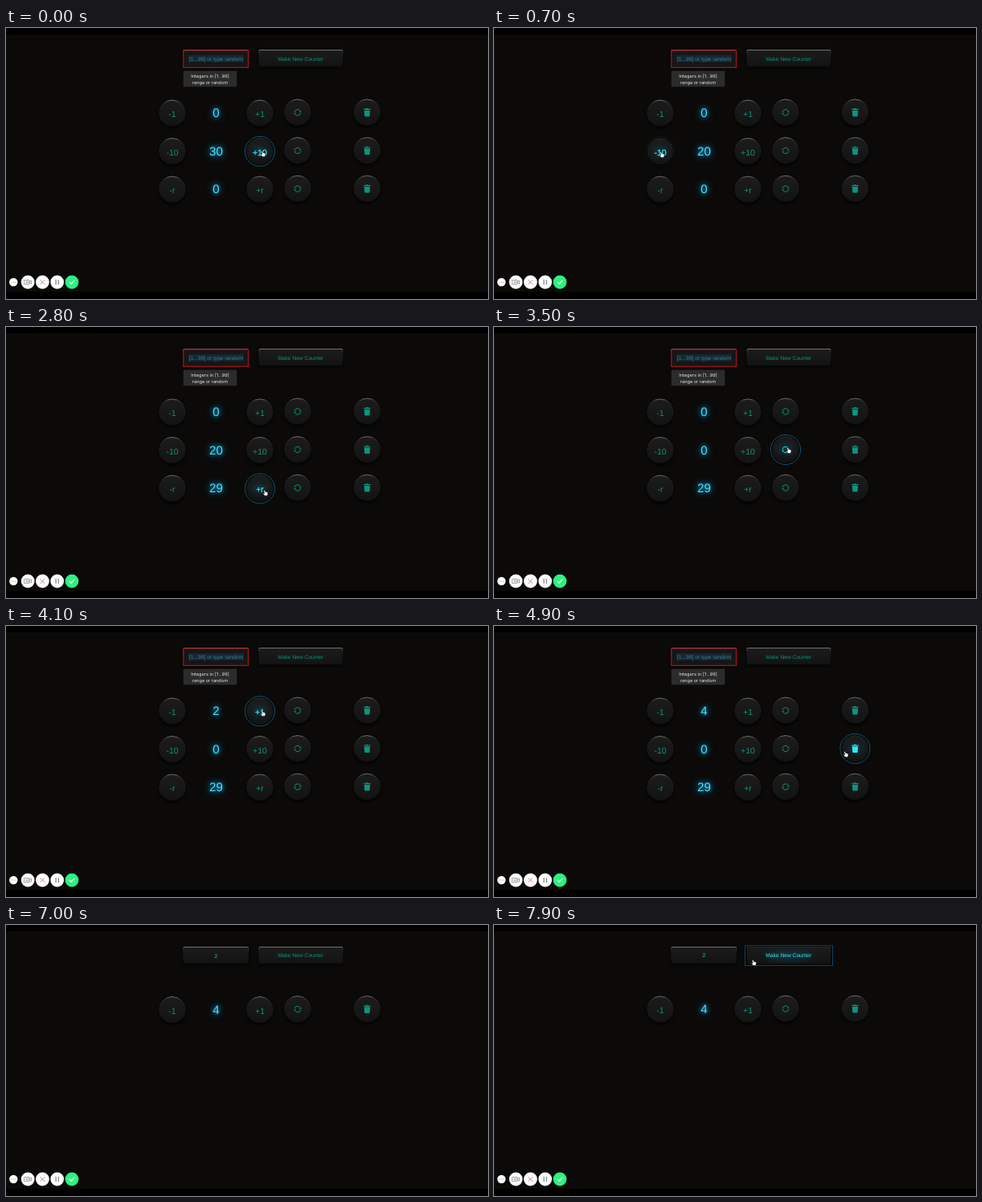
Animation, 600 px wide and 338 px high, one loop 8 s. Source, as an HTML page:

```html
<!DOCTYPE html>
<html lang="en">
<head>
<meta charset="utf-8">
<title>Counters</title>
<style>
  html, body { margin: 0; width: 100%; height: 100%; overflow: hidden; background: #000; }
  svg { display: block; width: 100%; height: 100%; }
  text { font-family: "Liberation Sans", Arial, sans-serif; text-anchor: middle; text-rendering: geometricPrecision; }
  .value { font-size: 15.2px; fill: #4fdff4; filter: drop-shadow(0 0 2px #0a86b4) drop-shadow(0 0 4px #066a9c); }
  .sign { font-size: 10.5px; }
  .small { font-size: 6.67px; }
  .tip { font: 5.6px Inter, sans-serif; fill: #e6e6e6; }
  .halo { fill: #0b86b8; filter: blur(4px); }
</style>
</head>
<body>
<svg id="stage" viewBox="0 0 600 338">
  <defs>
    <linearGradient id="face" x2="0" y2="1">
      <stop offset="0" stop-color="#1c1c1c"/><stop offset="1" stop-color="#131313"/>
    </linearGradient>
    <linearGradient id="rim" x2="0" y2="1">
      <stop offset="0" stop-color="#7a7a78"/><stop offset=".12" stop-color="#343433"/>
      <stop offset=".35" stop-color="#1a1a1a"/><stop offset="1" stop-color="#080808"/>
    </linearGradient>
    <filter id="soft" x="-30%" y="-30%" width="160%" height="160%"><feGaussianBlur stdDeviation="1.6"/></filter>
  </defs>
  <rect width="600" height="338"/>
  <rect y="8" width="600" height="321" fill="#0b0a09"/>
  <g id="page"></g>
  <g id="tools"></g>
  <g id="hand">
    <path fill="#fff" stroke="#111" stroke-width=".7" stroke-linejoin="round" transform="scale(.78)"
      d="M-2.6-4.2C-1.9-5-1.1-4.6-.8-3.8L-.2-1.7C.5-2.1 1-1.9 1.3-1.4 2-1.7 2.5-1.4 2.7-.9 3.4-1 3.9-.5 3.9.2L3.6 2.4 2.8 4.6H-1.1L-3.2 1.8C-4.2.9-3.6-.2-2.5.4L-1.6.9-2.8-3.2Z"/>
  </g>
  <path id="beam" fill="none" stroke="#cfd4d6" stroke-width=".8"
    d="M-1.6-4.5Q0-4.5 0-3.6V3.6Q0 4.5-1.6 4.5M1.6-4.5Q0-4.5 0-3.6M0 3.6Q0 4.5 1.6 4.5"/>
</svg>
<script>
const LOOP = 8000;
const NS = 'http://www.w3.org/2000/svg';
const TEAL = [14, 148, 124], CYAN = [44, 236, 240];
const ROW_Y = 105.6, PITCH = 47.6;
const $ = id => document.getElementById(id);
const page = $('page'), tools = $('tools');

function add(parent, tag, attrs = {}, text) {
  const node = document.createElementNS(NS, tag);
  for (const k in attrs) node.setAttribute(k, attrs[k]);
  if (text !== undefined) node.textContent = text;
  parent.appendChild(node);
  return node;
}
const move = (node, x, y) => node.setAttribute('transform', `translate(${x.toFixed(2)} ${y.toFixed(2)})`);
const show = (node, on) => node.setAttribute('display', on ? 'inline' : 'none');
const alpha = (node, a) => node.setAttribute('opacity', a.toFixed(3));
const clamp = v => Math.min(1, Math.max(0, v));
const mix = k => 'rgb(' + TEAL.map((c, i) => Math.round(c + (CYAN[i] - c) * k)) + ')';

// Last value of a [time, value] list that has begun
function stepAt(list, t) {
  let value = list[0][1];
  for (const [at, v] of list) if (t >= at) value = v;
  return value;
}

function pathAt(keys, t) {
  let i = 0;
  while (i < keys.length - 2 && t >= keys[i + 1][0]) i++;
  const [t0, x0, y0] = keys[i], [t1, x1, y1] = keys[i + 1];
  const u = clamp((t - t0) / (t1 - t0)), e = u * u * (3 - 2 * u);
  return [x0 + (x1 - x0) * e, y0 + (y1 - y0) * e];
}

// Hover strength: fades in after `from` and out after `to`
const fade = (t, from, to) => clamp(Math.min((t - from) / 250, 1 - (t - to) / 200));

const icons = {
  reset(g) {
    add(g, 'path', { fill: 'none', 'stroke-width': 1,
      d: 'M-3.7-.6A3.75 3.75 0 0 1 3.2-1.9M3.7.6A3.75 3.75 0 0 1-3.2 1.9' });
    add(g, 'path', { 'stroke-width': 0, d: 'M4.2-2.3V.1L2.1-.9ZM-4.2 2.3V-.1L-2.1.9Z' });
  },
  trash(g) {
    add(g, 'path', { 'stroke-width': 0,
      d: 'M-4.3-4.6H-1.6L-1-5.3H1L1.6-4.6H4.3V-3.4H-4.3ZM-3.7-2.7H3.7L3.2 4.2Q3.1 5 2.3 5H-2.3Q-3.1 5-3.2 4.2Z' });
  }
};

function roundButton(parent, x, y, label) {
  const g = add(parent, 'g', { transform: `translate(${x} ${y})` });
  add(g, 'circle', { cy: 2, r: 17, fill: '#000', opacity: .75, filter: 'url(#soft)' });
  const ring = add(g, 'circle', { r: 18.6, fill: '#080909', stroke: '#13526c', 'stroke-width': 1 });
  add(g, 'circle', { r: 16.4, fill: 'url(#face)' });
  const rim = add(g, 'circle', { r: 16.4, fill: 'none', stroke: 'url(#rim)', 'stroke-width': .9 });
  const halo = add(g, 'ellipse', { class: 'halo', rx: 9, ry: 5 });
  const mark = add(g, 'g');
  if (icons[label]) icons[label](mark);
  else add(mark, 'text', { class: 'sign', y: 4.6 }, label);
  return h => {
    const lit = clamp(h * 2), color = mix(lit);
    alpha(ring, h ** 3);
    alpha(rim, 1 - .8 * lit);
    alpha(halo, .32 * lit);
    mark.setAttribute('fill', color);
    mark.setAttribute('stroke', color);
    mark.setAttribute('stroke-width', .3 * lit);
  };
}

function makeRow(step) {
  const g = add(page, 'g');
  const value = add(g, 'text', { class: 'value', x: 261.5, y: 5.4 });
  const buttons = [
    roundButton(g, 207, .7, '-' + step),
    roundButton(g, 316, .7, '+' + step),
    roundButton(g, 363, -.2, 'reset'),
    roundButton(g, 449.5, -.2, 'trash')
  ];
  return { g, value, buttons };
}

function plate(parent, x, w) {
  const box = { x, y: 27.5, width: w, height: 20.8, rx: 1 };
  add(parent, 'rect', { x: x - .5, y: 29, width: w + 1, height: 21, fill: '#000', opacity: .75, filter: 'url(#soft)' });
  const ring = add(parent, 'rect', { x: x - 2.5, y: 25.7, width: w + 5, height: 24.8, fill: '#080909',
    stroke: '#0e4260', 'stroke-width': 1, opacity: 0 });
  add(parent, 'rect', { ...box, fill: 'url(#face)' });
  const rim = add(parent, 'rect', { ...box, fill: 'none', stroke: 'url(#rim)', 'stroke-width': .9 });
  return { ring, rim };
}

// Top form
const field = add(page, 'g');
plate(field, 221, 80.5);
const empty = add(field, 'g');
add(empty, 'rect', { x: 220.8, y: 28, width: 80.8, height: 21.3, fill: '#161617', stroke: '#b3141e', 'stroke-width': 1.1 });
add(empty, 'rect', { x: 227, y: 34, width: 69, height: 8.6, fill: '#16303b', opacity: .7 });
add(empty, 'text', { class: 'small', x: 261.5, y: 40.6, fill: '#3d7f96' }, '[1...99] or type random');
const typed = add(field, 'text', { class: 'small', x: 261.3, y: 41.1, fill: '#25c4c2' }, '2');

const tip = add(page, 'g');
add(tip, 'rect', { x: 220.8, y: 53.5, width: 66.5, height: 19.8, rx: 1, fill: '#2c2c2c' });
add(tip, 'text', { class: 'tip', x: 254, y: 62.4 }, 'Integers in [1...99]');
add(tip, 'text', { class: 'tip', x: 254, y: 69.7 }, 'range or random');

const maker = add(page, 'g');
const makerPlate = plate(maker, 315, 104);
const makerHalo = add(maker, 'ellipse', { class: 'halo', cx: 367, cy: 38.5, rx: 29, ry: 4 });
const makerText = add(maker, 'text', { class: 'small', x: 366.8, y: 40.7 }, 'Make New Counter');

const rows = ['1', '10', 'r'].map(makeRow);

// Recorder toolbar
function tool(x, r, fill, d, stroke, width) {
  add(tools, 'circle', { cx: x, cy: 317, r, fill });
  add(tools, 'path', { d, transform: `translate(${x} 317)`, fill: 'none', stroke, 'stroke-width': width,
    'stroke-linecap': 'round', 'stroke-linejoin': 'round' });
}
tool(9.3, 5.2, '#fff', 'M-2 0h0M0 0h0M2 0h0', '#b06a78', 1);
tool(27.2, 8.4, '#fff', 'M-4.2-2.6H1.8V2.6H-4.2ZM1.8-.7 4.4-2.1V2.1L1.8.7M-2.4 0H.2M-1.1-1.2V1.2', '#8b8b8b', .8);
tool(45.4, 8.4, '#fff', 'M-2.7-2.7 2.7 2.7M2.7-2.7-2.7 2.7', '#cf7f8e', 1);
tool(63.7, 8.4, '#fff', 'M-1.6-2.8V2.8M1.6-2.8V2.8', '#777', 1.1);
tool(82, 8.4, '#2bf47e', 'M-2.8.2-.8 2.2 3-2', '#fff', 1.3);

// Timeline
const counts = [
  [[0, 0], [3950, 1], [4100, 2], [4300, 3], [4400, 4]],
  [[0, 30], [700, 20], [3400, 0]],
  [[0, 0], [1700, 3], [2000, 6], [2200, 8], [2400, 19], [2600, 29]]
];
const alive = [[0, [0, 1, 2]], [5100, [0, 2]], [5750, [0]]];
const lift = [[0, 0], [7000, .35], [7200, .9]];
// slot, button, from, to
const hovers = [
  [1, 1, -900, 420], [1, 0, 560, 900], [2, 1, 1180, 3000],
  [1, 2, 3150, 3680], [0, 1, 3800, 4560], [1, 3, 4640, 5700]
];
const route = [
  [0, 320, 157], [280, 320, 157], [620, 209, 158], [860, 209, 158], [1300, 306, 199], [1520, 323, 207],
  [2820, 323, 207], [3250, 367, 154], [3640, 367, 154], [3900, 320, 109], [4460, 320, 109],
  [4860, 438, 160], [5300, 438, 160], [5600, 444, 160], [5830, 444, 160], [6420, 262, 39],
  [7580, 262, 39], [7860, 323.5, 47]
];

function draw(t) {
  const up = stepAt(lift, t);
  const list = stepAt(alive, t);
  rows.forEach((row, i) => {
    const slot = list.indexOf(i);
    show(row.g, slot >= 0);
    if (slot < 0) return;
    move(row.g, 0, ROW_Y + slot * PITCH - up);
    row.value.textContent = stepAt(counts[i], t);
    row.buttons.forEach((paint, b) => {
      let h = 0;
      for (const [s, k, from, to] of hovers) if (s === slot && k === b) h = Math.max(h, fade(t, from, to));
      paint(h);
    });
  });

  const filled = t >= 7000;
  show(empty, !filled);
  show(tip, !filled);
  show(typed, filled);
  move(typed, 0, -up);

  const h = fade(t, 7640, LOOP + 500), lit = clamp(h * 2);
  alpha(makerPlate.ring, h ** 3);
  alpha(makerPlate.rim, 1 - .8 * lit);
  alpha(makerHalo, .35 * lit);
  makerText.setAttribute('fill', mix(lit));
  move(makerText, 0, -up);

  const [x, y] = pathAt(route, t);
  const inField = t > 5900 && x > 221 && x < 301 && y > 27 && y < 49;
  move($('hand'), x, y);
  move($('beam'), x, y);
  show($('hand'), !inField);
  show($('beam'), inField && (t < 7000 || t > 7600));
}

const start = performance.now();
function tick() {
  draw((performance.now() - start) % LOOP);
  requestAnimationFrame(tick);
}
draw(0);
requestAnimationFrame(tick);
</script>
</body>
</html>
```
